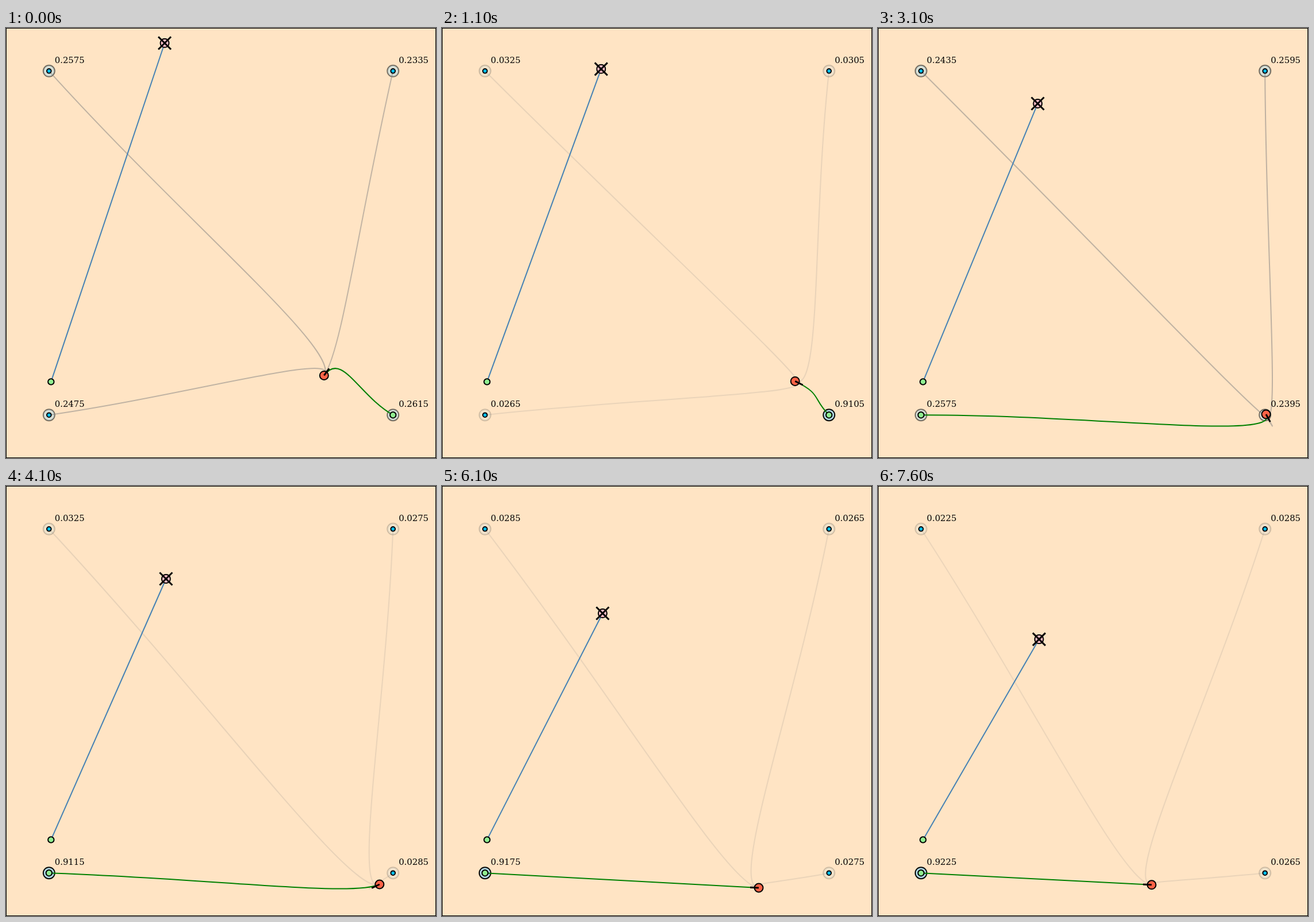
These frames come from a looping animation (748x748 px, 8000 ms). An HTML page with a canvas:

```html
<!DOCTYPE html>
<html lang="en">
<head>
<meta charset="utf-8">
<title>Goal inference</title>
<style>
html, body { margin: 0; width: 100%; height: 100%; overflow: hidden; background: #ffe4c4; }
canvas { display: block; }
</style>
</head>
<body>
<canvas id="stage" width="748" height="748"></canvas>
<script>
const ctx = document.getElementById('stage').getContext('2d');
const SIZE = 748, LOOP = 8000, FIRST = 100, STEP = 500;
const NEAR = SIZE * .1, FAR = SIZE * .9;
const GOALS = [[NEAR, NEAR], [FAR, NEAR], [NEAR, FAR], [FAR, FAR]];
const BOTTOM_LEFT = 2, BOTTOM_RIGHT = 3;
const SWITCH = 7; // step at which the agent picks a new goal
const START = [78.3, 615.4];
const SPEED = 25;
const LAUNCH = SIZE * .07; // length of the curve handle along the heading

// key poses of the agent's walk
const KEYS = [
  { step: 0, x: 553.3, y: 604.4, deg: -54 },
  { step: 3, x: 614.2, y: 614.4, deg: 26 },
  { step: 5, x: 653.3, y: 646, deg: 43 },
  { step: 7, x: 675, y: 672, deg: 61 },
  { step: 8, x: 671.5, y: 684.5, deg: 127 },
  { step: 9, x: 649.8, y: 693, deg: 155 },
  { step: 13, x: 551, y: 699, deg: 183 },
  { step: 16, x: 476, y: 693.8, deg: 183 }
];

const direction = deg => [Math.cos(deg * Math.PI / 180), Math.sin(deg * Math.PI / 180)];

// cubic Hermite between key poses; the heading follows the path
function poseAt(step) {
  const next = Math.max(1, KEYS.findIndex(k => k.step >= step));
  const a = KEYS[next - 1], b = KEYS[next];
  const span = b.step - a.step, u = (step - a.step) / span;
  const va = direction(a.deg), vb = direction(b.deg);
  const reach = SPEED * span;
  const blend = u * u * (3 - 2 * u);
  const along = (p, q, i) => p + (q - p) * blend
    + reach * u * (1 - u) * ((1 - u) * va[i] - u * vb[i]);
  const slope = (p, q, i) => 6 * u * (1 - u) * (q - p)
    + reach * ((1 - u) * (1 - 3 * u) * va[i] + u * (3 * u - 2) * vb[i]);
  const dx = slope(a.x, b.x, 0), dy = slope(a.y, b.y, 1), length = Math.hypot(dx, dy);
  return {
    at: [along(a.x, b.x, 0), along(a.y, b.y, 1)],
    heading: [dx / length, dy / length]
  };
}

function noise(n) {
  const v = Math.sin(n * 12.9898) * 43758.5453;
  return v - Math.floor(v);
}

// unsure at the start and around the switch, otherwise settled on the goal
function beliefAt(step, goal) {
  const unsure = step === 0 || step === SWITCH - 1 || step === SWITCH;
  const [low, spread] = unsure ? [.2325, 28] : [.0225, 11];
  const belief = GOALS.map((_, i) => low + Math.floor(noise(step * 4 + i + 1) * spread) / 1000);
  belief[goal] = 0;
  belief[goal] = 1 - belief.reduce((a, b) => a + b);
  return belief;
}

function stroke(color, width) {
  ctx.strokeStyle = color;
  ctx.lineWidth = width;
  ctx.stroke();
}

function disc([x, y], r, fill) {
  ctx.beginPath();
  ctx.arc(x, y, r, 0, Math.PI * 2);
  ctx.fillStyle = fill;
  ctx.fill();
  stroke('#000', 2);
}

function line(x1, y1, x2, y2, color, width) {
  ctx.beginPath();
  ctx.moveTo(x1, y1);
  ctx.lineTo(x2, y2);
  stroke(color, width);
}

// leaves along the heading, then bends toward the midpoint of the direct line
function route([x, y], [hx, hy], [gx, gy], color) {
  ctx.beginPath();
  ctx.moveTo(x, y);
  ctx.bezierCurveTo(
    x + hx * LAUNCH, y + hy * LAUNCH,
    (x + gx) / 2, (y + gy) / 2,
    gx, gy);
  stroke(color, 2);
}

function drawCross([x, y]) {
  const arm = 11;
  disc([x, y], 7.5, 'pink');
  line(x - arm, y - arm, x + arm, y + arm, '#000', 3);
  line(x - arm, y + arm, x + arm, y - arm, '#000', 3);
}

function drawAgent([x, y], [hx, hy]) {
  disc([x, y], 7.5, 'tomato');
  line(x, y, x + hx * 15, y + hy * 15, '#000', 3);
}

function draw(step) {
  const { at, heading } = poseAt(step);
  const goal = step < SWITCH ? BOTTOM_RIGHT : BOTTOM_LEFT;
  const belief = beliefAt(step, goal);
  const target = [276 + .26 * step, 26.3 + 15.02 * step];

  ctx.fillStyle = '#ffe4c4';
  ctx.fillRect(0, 0, SIZE, SIZE);
  ctx.strokeStyle = '#000';
  ctx.lineWidth = 1;
  ctx.strokeRect(.5, .5, SIZE - 1, SIZE - 1);

  GOALS.forEach((g, i) => {
    ctx.globalAlpha = Math.sqrt(belief[i]);
    disc(g, 10, 'lightblue');
    if (i !== goal) route(at, heading, g, 'gray');
  });
  ctx.globalAlpha = 1;
  route(at, heading, GOALS[goal], 'green');

  ctx.font = '14.8px "DejaVu Serif", serif';
  GOALS.forEach((g, i) => {
    if (i === goal) disc(g, 5.2, 'lightgreen');
    else disc(g, 3.8, 'deepskyblue');
    ctx.fillStyle = '#000';
    ctx.fillText(String(+belief[i].toFixed(4)), g[0] + 10, g[1] - 14);
  });

  line(...START, ...target, 'steelblue', 2);
  disc(START, 5.2, 'lightgreen');
  drawCross(target);
  drawAgent(at, heading);
}

function tick() {
  const t = performance.now() % LOOP;
  draw(t < FIRST ? 0 : 1 + Math.floor((t - FIRST) / STEP));
  requestAnimationFrame(tick);
}
tick();
</script>
</body>
</html>
```
